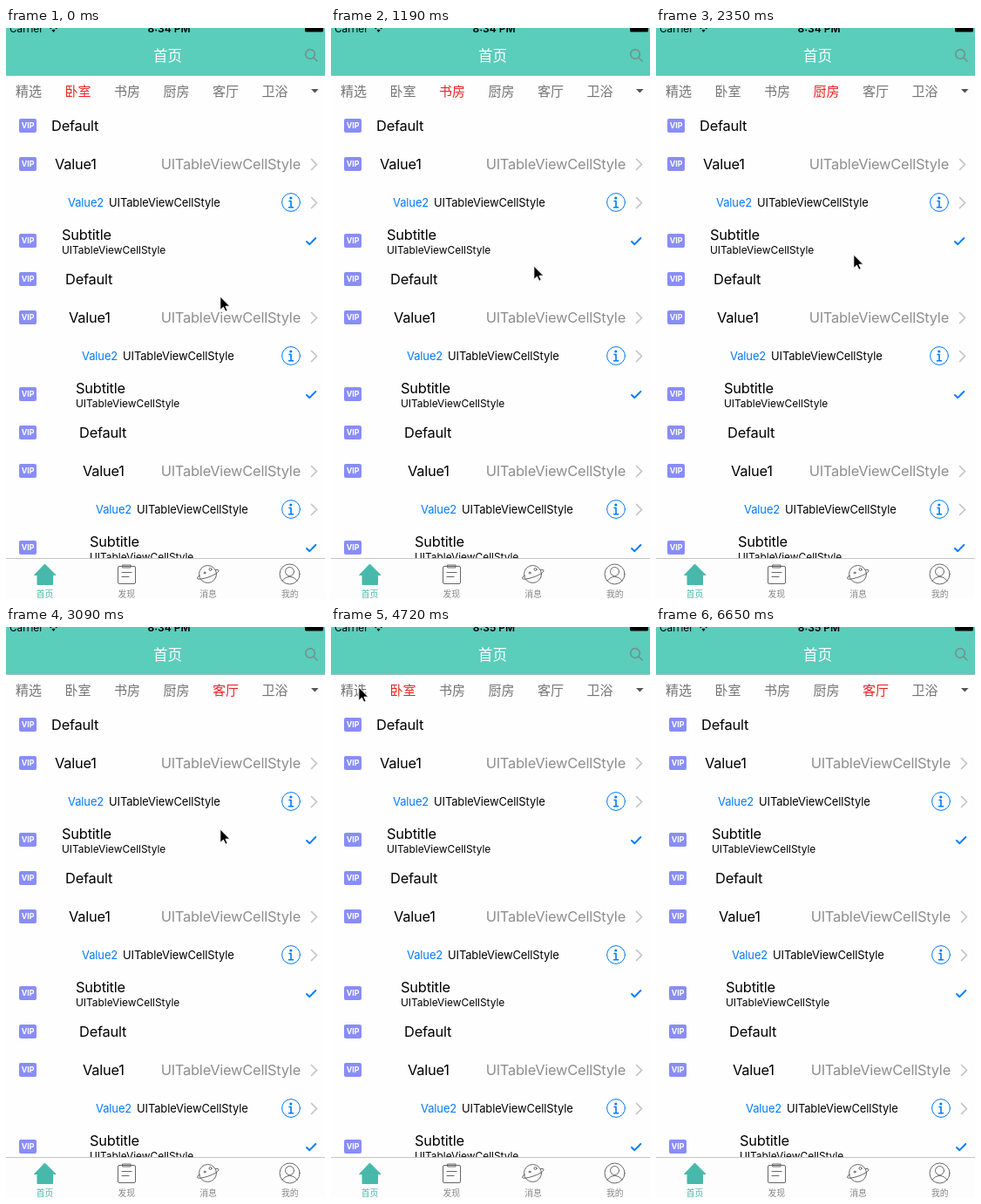
Write an HTML page that moves like this. It is 366 px wide and 655 px high and loops after 7610 ms.

```html
<!DOCTYPE html>
<html lang="zh">
<head>
<meta charset="utf-8">
<style>
html, body { margin: 0; width: 100%; height: 100%; overflow: hidden; background: #fefefe; }
svg { display: block; width: 366px; height: 655px; font-family: Inter, "Noto Sans CJK SC", "Noto Sans CJK", sans-serif; }
.body { font-size: 16.4px; letter-spacing: -.2px; }
.mid { font-size: 12.9px; letter-spacing: -.08px; }
.small { font-size: 11.9px; }
.light { font-weight: 300; }
.line { fill: none; stroke-linecap: round; stroke-linejoin: round; }
.center { text-anchor: middle; }
</style>
</head>
<body>
<svg viewBox="0 0 366 655">
  <defs><g id="page"></g></defs>
  <rect width="366" height="655" fill="#fefefe"/>
  <use id="left" href="#page"/>
  <use id="right" href="#page"/>

  <rect y="55" width="366" height="35" fill="#fefefe"/>
  <g id="tabs" class="center light" font-size="15"></g>
  <path d="M350 70h8.6l-4.3 4.6z" fill="#555"/>

  <rect width="366" height="54" fill="#5bcdbb"/>
  <rect y="54" width="366" height="1" fill="#9cc0b8"/>
  <text x="4" y="5" font-size="11.8">Carrier</text>
  <path class="line" d="M51 .4q3.500-2.500 7 0" stroke="#000" stroke-width="1.4"/>
  <path d="M52.5 2.500q2-1.500 4 0l-2 2.500z"/>
  <text id="clock" class="center" x="187" y="5" font-size="12" font-weight="600"></text>
  <rect x="343" y="-5" width="21" height="9.500" rx="1.5"/>
  <text class="center light" x="185.5" y="38.4" font-size="16.5" fill="#fff">首页</text>
  <g class="line" stroke="#75918c" stroke-width="1.7"><circle cx="349" cy="30" r="5.3"/><path d="M353 34l4 4"/></g>

  <rect y="608" width="366" height="47" fill="#fdfdfd"/>
  <rect y="608" width="366" height="1" fill="#c4c4c4"/>
  <path d="M44.5 615L57 627.5H53.5V638.5H36V627.5H32.5Z" fill="#47b9aa" stroke="#47b9aa" stroke-linejoin="round"/>
  <g class="line" stroke="#666">
    <rect x="128.5" y="617.5" width="20" height="20" rx="1.5"/>
    <path d="M134 616h9v3h-9zM133 624.5h11M133 629.5h8"/>
    <circle cx="231.5" cy="626.5" r="10"/>
    <path d="M240.5 621.5q4-.5 3.500 1.500q-2 3.500-12 7q-11 3.500-12.500 1.500q-.5-2 3-3.500"/>
    <circle cx="234.5" cy="621" r="1.5"/><circle cx="228" cy="625" r="1"/>
    <circle cx="325.5" cy="626.5" r="11.5"/>
    <circle cx="325.5" cy="623.5" r="5"/>
    <path d="M317 634.5q3-5 8.500-5t8.500 5"/>
  </g>
  <g id="nav" class="center" font-size="9.8"></g>
  <path id="cursor" d="M.8 1V16.5L4.4 13.2L6.9 18.3L9.2 17.2L6.9 12.2H11.8Z" stroke="#fff"/>
</svg>
<script>
const $ = id => document.getElementById(id);
const LOOP = 7610, PAGE = 375, TICK = 148, BLUE = '#007aff';
const text = (x, y, cls, s, more = '') => `<text x="${x}" y="${y}" class="${cls}" ${more}>${s}</text>`;
const stroke = (d, color, w) => `<path class="line" d="${d}" stroke="${color}" stroke-width="${w}"/>`;

// The list cycles through the four standard cell styles, each row indented 4px more.
function row(i) {
  const y = 112 + 44 * i, x = 52 + 4 * i, kind = i % 4, style = 'UITableViewCellStyle';
  const chevron = stroke(`M350.5 ${y - 5.5}l6 6l-6 6`, '#c3c3c8', 1.7);
  const vip = `<rect x="15" y="${y - 8}" width="20" height="16" rx="2" fill="#898df7"/>` +
    text(25, y + 3.2, 'center', 'VIP', 'font-size="8.8" font-weight="700" fill="#fff"');
  if (kind == 0) return vip + text(x, y + 6, 'body', 'Default');
  if (kind == 1) return vip + text(x, y + 6, 'body', 'Value1') +
    text(338, y + 6, 'body', style, 'text-anchor="end" fill="#8e8e90"') + chevron;
  if (kind == 2) return text(x + 11, y + 4.5, 'mid', 'Value2', `fill="${BLUE}"`) +
    text(x + 58, y + 4.5, 'mid', style) +
    `<circle class="line" cx="327" cy="${y}" r="10.4" stroke="${BLUE}"/>` +
    `<circle cx="326.8" cy="${y - 5}" r="1.6" fill="${BLUE}"/>` +
    stroke(`M325 ${y - 1.5}h2v7M324.5 ${y + 5.7}h5`, BLUE, 1.6) + chevron;
  return vip + text(x, y - 1, 'body', 'Subtitle') + text(x, y + 15, 'small', style) +
    stroke(`M345 ${y + 1}l3.3 3.2l7-7.2`, BLUE, 1.9);
}

$('page').innerHTML = Array.from({ length: 12 }, (_, i) => row(i)).join('');
$('tabs').innerHTML = ['精选', '卧室', '书房', '厨房', '客厅', '卫浴']
  .map((s, i) => text(26 + 56.5 * i, 78, '', s)).join('');
$('nav').innerHTML = ['首页', '发现', '消息', '我的']
  .map((s, i) => text(44.5 + 93.75 * i, 653, '', s, `fill="${i ? '#858585' : '#47b9aa'}"`)).join('');

// Each gesture: start and end time, page it leads to, pointer place at its start.
const gestures = [
  [590, 1190, 2, 245, 307],
  [1640, 2070, 3, 232, 272],
  [2350, 3090, 4, 226, 259],
  [3090, 3390, 4, 245, 231],
  [3540, 3980, 5, 303, 69],
  [4280, 4720, 1, 82, 69],
  [5030, 5610, 0, 31, 68],
  [5910, 6350, 4, 246, 70],
  [6650, 6650, 4, 318, 513]
].map(([start, end, to, x, y]) => ({ start, end, to, x, y, tap: y < 90 }));

const smooth = u => u * u * (3 - 2 * u);
const mix = (a, b, u) => a + (b - a) * u;

// The screen refreshes in ticks while a gesture runs and rests in between.
function progress(g, t) {
  const ticks = Math.round((g.end - g.start) / TICK) || 1;
  const passed = Math.floor((t - g.start + 5) / (g.end - g.start || 1) * ticks);
  return Math.max(0, Math.min(1, passed / ticks));
}

function stateAt(t) {
  let page = 1, tab = 1, [{ x, y }] = gestures;
  gestures.forEach((g, i) => {
    if (t < g.start) return;
    const u = progress(g, t), next = gestures[i + 1] || g;
    const speed = g.tap ? (g.end - g.start) / 300 : 1;
    page = mix(page, g.to, smooth(Math.min(1, u * speed + (g.tap ? .015 : .042))));
    tab = g.tap ? g.to : Math.round(page);
    // A swipe drags the pointer left and lets it come back.
    const drag = !g.tap && next.to != g.to || g.to == 4 && !g.tap && next.y > 90 ? 65 * Math.sin(Math.PI * u) : 0;
    x = mix(g.x, next.x, smooth(u)) - drag;
    y = mix(g.y, next.y, smooth(u));
  });
  return { page, tab, x: Math.round(x), y: Math.round(y) };
}

function draw() {
  const t = performance.now() % LOOP, { page, tab, x, y } = stateAt(t);
  const shift = Math.round(page * PAGE) % PAGE;
  $('left').setAttribute('x', -shift);
  $('right').setAttribute('x', PAGE - shift);
  [...$('tabs').children].forEach((el, i) => el.setAttribute('fill', i == tab ? '#ee2222' : '#747474'));
  $('clock').textContent = t < 3540 ? '8:34 PM' : '8:35 PM';
  $('cursor').setAttribute('transform', `translate(${x} ${y})`);
  $('cursor').setAttribute('visibility', t < 6650 ? 'visible' : 'hidden');
  requestAnimationFrame(draw);
}
draw();
</script>
</body>
</html>
```
